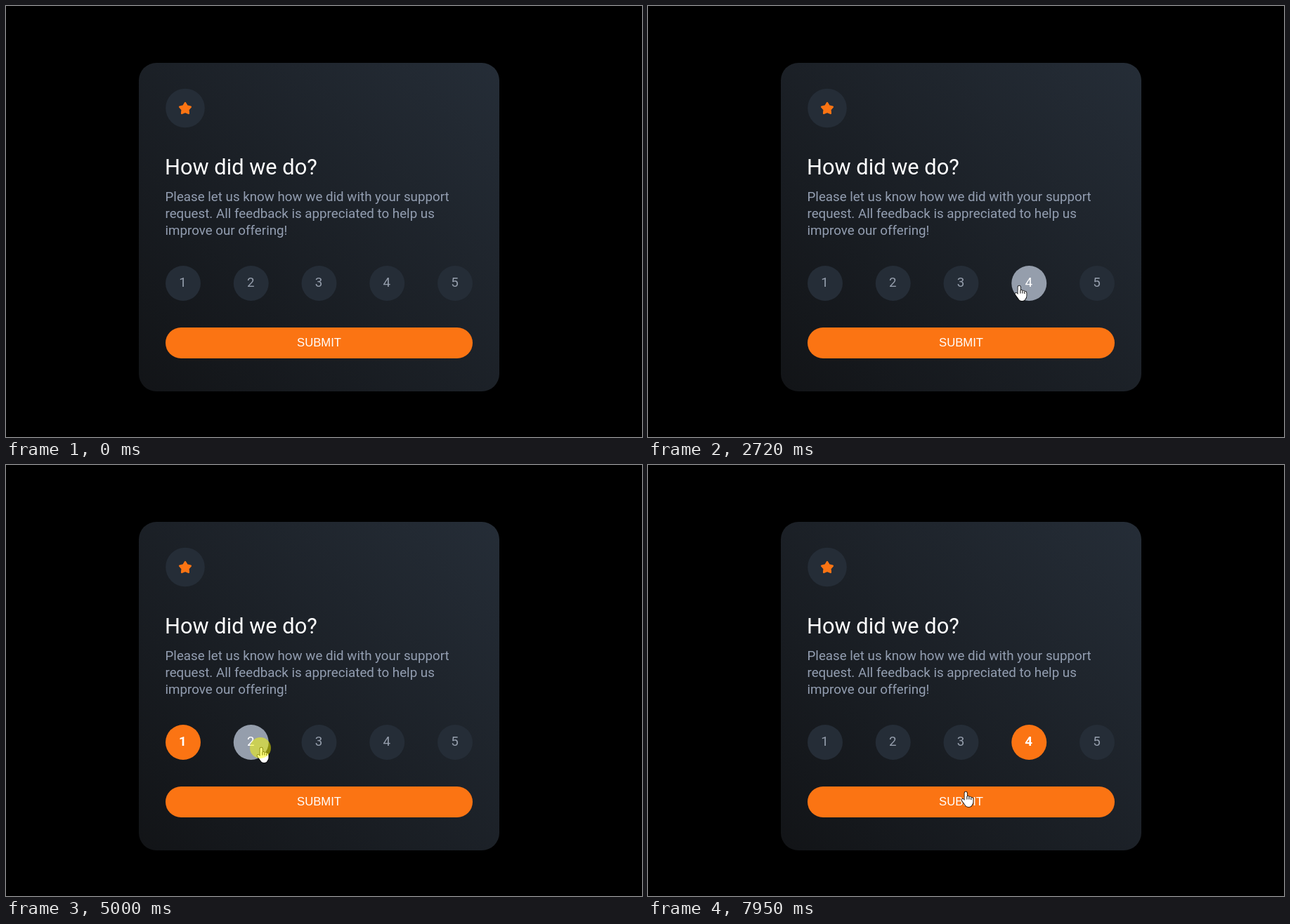
An HTML page with a canvas that plays this animation: 905x614 px, repeating every 8000 ms.

```html
<!DOCTYPE html>
<html lang="en">
<head>
<meta charset="utf-8">
<title>Rating card</title>
<style>
  html, body { margin: 0; width: 100%; height: 100%; overflow: hidden; background: #000; }
  canvas { display: block; }
</style>
</head>
<body>
<canvas id="stage" width="905" height="614"></canvas>
<script>
const ctx = document.getElementById('stage').getContext('2d');
const LOOP = 8000;
const ORANGE = '#fb7413', DARK = '#252d37', GREY = '#959eac', WHITE = '#fff';
const SANS = 'Roboto, sans-serif';
const BUTTON = { x: 227, y: 458, w: 437, h: 44 };
const RATINGS = [1, 2, 3, 4, 5], RATING_Y = 395, RATING_R = 25;
const ratingX = n => 252 + 96.75 * (n - 1);

// A click holds the mouse down for HOLD ms; the pointer rests LEAD ms before it
const HOLD = 80, LEAD = 140;
const clicks = [
  { press: 4400, rating: 1 }, { press: 5000, rating: 2 }, { press: 5480, rating: 3 },
  { press: 5960, rating: 4 }, { press: 6600, rating: 5 }, { press: 7190, rating: 4 }
];
const aim = n => ({ x: 271 + 90.5 * (n - 1), y: 403 });

const stops = [
  { at: 810, x: 843, y: 582 },
  { at: 1270, x: 330, y: 176 },
  { at: 1550, x: 124, y: 283 },
  { at: 2180, x: 318, y: 394 },
  { at: 3340, x: 684, y: 402 },
  { at: 3540, x: 684, y: 402 },
  ...clicks.flatMap(({ press, rating }) => [
    { at: press - LEAD, ...aim(rating) },
    { at: press + HOLD, ...aim(rating) }
  ]),
  { at: 7950, x: 451, y: 466 }
];

const easeOut = k => 1 - (1 - k) ** 1.35;

function pointerAt(t) {
  if (t < stops[0].at) return null;
  const next = stops.findIndex(s => s.at > t);
  if (next < 0) return stops.at(-1);
  const a = stops[next - 1], b = stops[next];
  const k = easeOut((t - a.at) / (b.at - a.at));
  return { x: Math.round(a.x + (b.x - a.x) * k), y: Math.round(a.y + (b.y - a.y) * k) };
}

function disc(x, y, r, fill) {
  ctx.beginPath();
  ctx.arc(x, y, r, 0, Math.PI * 2);
  ctx.fillStyle = fill;
  ctx.fill();
}

function box(x, y, w, h, r, fill) {
  ctx.beginPath();
  ctx.roundRect(x, y, w, h, r);
  ctx.fillStyle = fill;
  ctx.fill();
}

function text(str, x, y, font, fill, align = 'left') {
  ctx.font = font;
  ctx.fillStyle = fill;
  ctx.textAlign = align;
  ctx.fillText(str, x, y);
}

function drawStar(cx, cy) {
  ctx.beginPath();
  for (let i = 0; i < 10; i++) {
    const r = i % 2 ? 4.6 : 8.2, a = i * Math.PI / 5;
    ctx.lineTo(cx + r * Math.sin(a), cy - r * Math.cos(a));
  }
  ctx.closePath();
  ctx.fillStyle = ctx.strokeStyle = ORANGE;
  ctx.lineWidth = 2.5;
  ctx.lineJoin = 'round';
  ctx.fill();
  ctx.stroke();
}

function drawCard() {
  ctx.fillStyle = '#000';
  ctx.fillRect(0, 0, 905, 614);
  const shade = ctx.createLinearGradient(200, 560, 691, 70);
  shade.addColorStop(0, '#121417');
  shade.addColorStop(1, DARK);
  box(189, 81, 513, 468, 25, shade);
  disc(255, 145.5, 27.8, DARK);
  drawStar(255, 146.3);
  text('How did we do?', 226, 240, `400 30.8px ${SANS}`, WHITE);
  ['Please let us know how we did with your support',
   'request. All feedback is appreciated to help us',
   'improve our offering!'
  ].forEach((line, i) => text(line, 226.5, 278 + 24 * i, `18.75px ${SANS}`, '#939eb1'));
  box(BUTTON.x, BUTTON.y, BUTTON.w, BUTTON.h, 22, ORANGE);
  text('SUBMIT', 445.5, 485, '16.667px "Liberation Sans", Arial, sans-serif', WHITE, 'center');
}

function drawRatings(selected, hovered) {
  for (const n of RATINGS) {
    const on = n === selected, over = n === hovered;
    disc(ratingX(n), RATING_Y, RATING_R, on ? ORANGE : over ? GREY : DARK);
    text(n, ratingX(n) - 0.5, 400, `${on ? 700 : 400} 18.75px ${SANS}`, on || over ? WHITE : GREY, 'center');
  }
}

const ARROW = new Path2D('M0 0V16.2L3.7 12.9L6.2 18.6L9 17.4L6.6 11.9H11.2Z');
const HAND = new Path2D('M4.5 14V2.4Q4.6.5 6.2.5Q7.8.5 7.9 2.4V7.2' +
  'Q9.6 6.2 10.9 7.9Q12.6 7 13.8 8.8Q16.5 8.2 16.5 11V15Q16.5 17.5 15 19' +
  'Q14 22 10.2 22Q6.6 22 5.2 19L1 13.2Q-.2 11 1.6 10.7Q3 10.7 4.5 13Z');
const KNUCKLES = new Path2D('M7.9 7V11.5M10.9 8V11.5M13.8 9V12');

function drawPointer({ x, y }, isHand) {
  const shape = isHand ? HAND : ARROW;
  ctx.save();
  ctx.translate(x - (isHand ? 5 : 0), y - (isHand ? 1 : 0));
  ctx.fillStyle = WHITE;
  ctx.strokeStyle = '#000';
  ctx.lineWidth = 1.6;
  ctx.lineJoin = 'round';
  ctx.stroke(shape);
  ctx.fill(shape);
  ctx.lineWidth = 1;
  if (isHand) ctx.stroke(KNUCKLES);
  ctx.restore();
}

const overButton = ({ x, y }) =>
  x >= BUTTON.x && x < BUTTON.x + BUTTON.w && y >= BUTTON.y && y < BUTTON.y + BUTTON.h;

const ratingUnder = ({ x, y }) =>
  RATINGS.find(n => Math.hypot(x - ratingX(n), y - RATING_Y) < RATING_R);

function draw(t) {
  const pointer = pointerAt(t);
  const hovered = pointer && ratingUnder(pointer);
  const selected = clicks.filter(c => c.press + HOLD <= t).pop()?.rating;
  const pressed = clicks.some(c => c.press <= t && t < c.press + HOLD);
  drawCard();
  drawRatings(selected, hovered);
  if (!pointer) return;
  drawPointer(pointer, hovered || overButton(pointer));
  if (pressed) disc(pointer.x, pointer.y, 15, 'rgba(255, 255, 0, 0.5)');
}

const begin = performance.now();
function frame() {
  draw((performance.now() - begin) % LOOP);
  requestAnimationFrame(frame);
}
frame();
</script>
</body>
</html>
```
